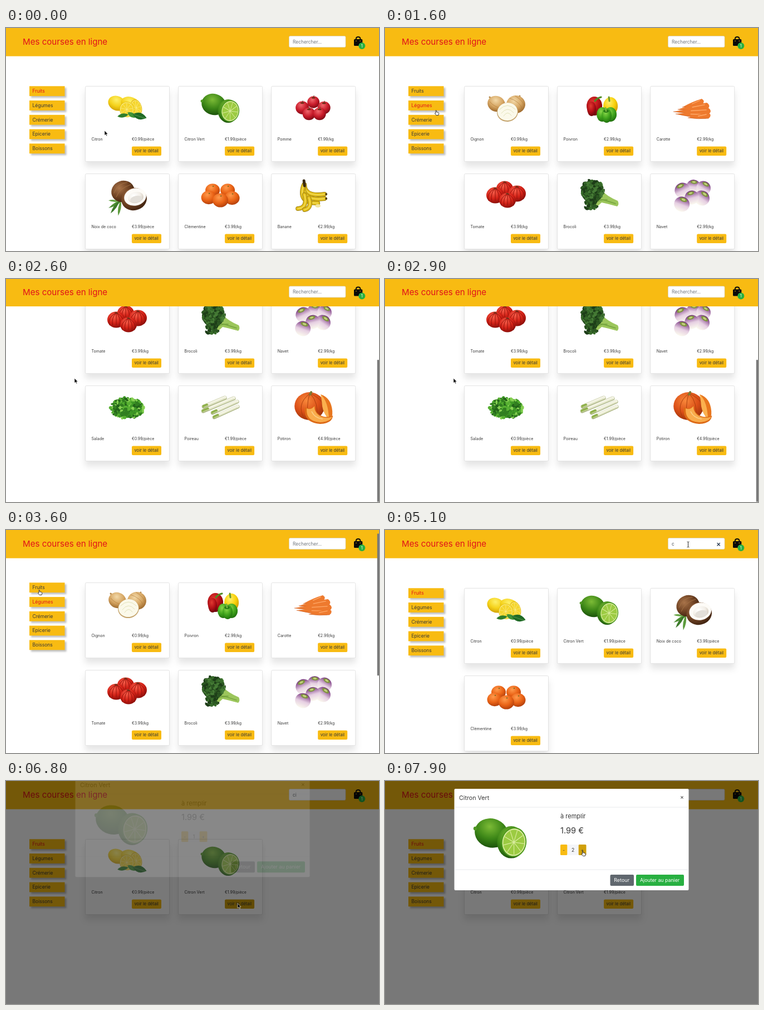
Animation, 670 px wide and 400 px high, one loop 8 s. Source, as an HTML page:

```html
<!DOCTYPE html>
<html lang="fr">
<head>
<meta charset="utf-8">
<title>Mes courses en ligne</title>
<style>
  html, body { margin: 0; width: 100%; height: 100%; overflow: hidden; background: #fff; }
  svg { display: block; width: 670px; height: 400px; font-family: Inter, "Open Sans", sans-serif; }
  text { fill: #383838; white-space: pre; }
  .card { fill: #fff; stroke: #dcdcdc; stroke-width: .8; filter: drop-shadow(0 9px 6px rgba(0, 0, 0, .1)); }
  .tab { fill: #f8bb12; filter: drop-shadow(3px 3px 1.5px rgba(0, 0, 0, .25)); }
</style>
</head>
<body>
<svg id="stage" viewBox="0 0 670 400"></svg>
<script>
const LOOP = 8000, GOLD = '#f8bb12', DARK_GOLD = '#d0a009', RED = '#e0131a', GREEN = '#28b041';
const MAX_SCROLL = 227, THUMB = 255;

let seed = 7;
const rand = () => (seed = seed * 16807 % 2147483647) / 2147483647;

// ---- drawing helpers ----
const text = (x, y, size, str, more = '') => `<text x="${x}" y="${y}" font-size="${size}" ${more}>${str}</text>`;
const rect = (x, y, w, h, fill, more = '') => `<rect x="${x}" y="${y}" width="${w}" height="${h}" fill="${fill}" ${more}/>`;
const ball = (x, y, rx, ry, fill, rot = 0) =>
  `<ellipse rx="${rx}" ry="${ry}" fill="${fill}" transform="translate(${x} ${y}) rotate(${rot})"/>`;
const shape = (d, fill) => `<path d="${d}" fill="${fill}"/>`;
const line = (d, color, w = 1) =>
  `<path d="${d}" fill="none" stroke="${color}" stroke-width="${w}" stroke-linecap="round"/>`;
const leaf = (x, y, l, w, rot, fill) =>
  `<path transform="translate(${x} ${y}) rotate(${rot})" d="M${-l} 0Q0 ${-w} ${l} 0Q0 ${w} ${-l} 0" fill="${fill}"/>`;

let gradients = '';
const stops = (a, b, c) => `<stop stop-color="${a}"/><stop offset=".55" stop-color="${b}"/><stop offset="1" stop-color="${c}"/>`;
const round = (id, a, b, c) => {
  gradients += `<radialGradient id="${id}" cx=".4" cy=".3" r=".75">${stops(a, b, c)}</radialGradient>`;
  return `url(#${id})`;
};
const lemon = round('lemon', '#fdf06a', '#f5d21a', '#d0a006');
const lime = round('lime', '#7cbb36', '#3c8617', '#194f0a');
const apple = round('apple', '#f0666c', '#c81b2a', '#740913');
const coco = round('coco', '#a9744a', '#6f4223', '#3a1f0e');
const milk = round('milk', '#ffffff', '#f3efe8', '#cfc5b8');
const orange = round('orange', '#ff9a4c', '#ea6316', '#ac3b0a');
const onion = round('onion', '#f3d9a8', '#d5a562', '#9a6529');
const redPep = round('redPep', '#e23a32', '#b20f16', '#62050a');
const yellowPep = round('yellowPep', '#fff06a', '#f8d008', '#c99300');
const greenPep = round('greenPep', '#8ad84a', '#3fa31c', '#1c6a0c');
const tomato = round('tomato', '#f8604c', '#d42318', '#820c08');
const pumpkin = round('pumpkin', '#f8883a', '#dc5018', '#98300a');
gradients += `<linearGradient id="navet" x2="0" y2="1">${stops('#6f2a78', '#e6cfe2', '#fbf9ee')}</linearGradient>`;

const slice = (x, y, rx, ry, rind, pith, flesh, rot = 0) => {
  let rays = '';
  for (let i = 0; i < 9; i++) {
    const a = i * Math.PI / 4.5;
    rays += `M0 0L${.8 * Math.cos(a)} ${.8 * Math.sin(a)}`;
  }
  return `<g transform="translate(${x} ${y}) rotate(${rot}) scale(${rx} ${ry})">` +
    ball(0, 0, 1, 1, rind) + ball(0, 0, .92, .92, pith) + ball(0, 0, .84, .84, flesh) + line(rays, pith, .05) + '</g>';
};

const cluster = (n, x, y, rx, ry, size, colors) => {
  let s = '';
  for (let i = 0; i < n; i++) {
    const a = rand() * 6.283, d = Math.sqrt(rand());
    s += ball(x + rx * d * Math.cos(a), y + ry * d * Math.sin(a), size * (.6 + rand() * .6), size * (.4 + rand() * .4),
      colors[Math.floor(rand() * colors.length)], rand() * 180);
  }
  return s;
};

const redApple = (x, y, r) => ball(x, y, r, r * .98, apple) + ball(x, y - r * .7, r * .3, 1.3, '#6b2a14') +
  line(`M${x} ${y - r * .7}l1 -4`, '#54381c', 1);
const clementine = (x, y, r) => ball(x, y, r, r * .9, orange) + ball(x + 1, y - r * .55, 1.3, .9, '#5c6b1c');
const ribbed = (x, y, r) => ball(x, y, r, r * .9, tomato) +
  [-.75, -.4, 0, .4, .75].map(k => line(`M${x} ${y - r * .8}Q${x + k * r * 1.4} ${y - r * .2} ${x + k * r} ${y + r * .6}`, '#931009', 1)).join('') +
  leaf(x, y - r * .78, 4, 2, 10, '#5a3a1e');
const turnip = (x, y, r, rot) => `<g transform="translate(${x} ${y}) rotate(${rot})">` +
  ball(0, 0, r, r * .95, 'url(#navet)') + ball(0, -r * .6, r * .5, r * .25, '#7f9440') + ball(0, -r * .62, r * .25, r * .12, '#c3cf7c') + '</g>';
const carrot = (x, y, tx, ty, w) => shape(`M${x} ${y - w}Q${x + w * 1.4} ${y} ${x} ${y + w}Q${(x + tx) / 2} ${(y + ty) / 2 + w} ${tx} ${ty}Q${(x + tx) / 2} ${(y + ty) / 2 - w} ${x} ${y - w}`, '#ee7a2e') +
  line(`M${x - 4} ${y - w * .4}L${(x + tx) / 2} ${(y + ty) / 2 - 1}`, '#ffab6b', 1.3) + line(`M${x} ${y + w}Q${(x + tx) / 2} ${(y + ty) / 2 + w} ${tx} ${ty}`, '#c9571a', .7);
const leek = (x, y, tx, ty) => line(`M${x} ${y}L${tx} ${ty}`, '#a3ad78', 6.8) + line(`M${x} ${y - .6}L${tx} ${ty - .6}`, '#f4f4e4', 5.4) +
  line(`M${x} ${y - .6}L${x + (tx - x) * .15} ${y + (ty - y) * .15 - .6}`, '#8fb14a', 5) + line(`M${x} ${y + 1}L${tx} ${ty + 1}`, '#d5dbb2', 1);
const banana = d => line(d, '#8d7310', 8) + line(d, '#e0bb18', 6.6) + line(d, '#f2da50', 2);

// Each picture is centred on 0,0 and about 70 wide.
const art = {
  'Citron': ball(-19, -9, 16, 13, lemon, 25) + ball(6, -8, 18, 12, lemon, 20) +
    slice(16, -1, 10, 15, '#e3b90c', '#fbec8a', '#f5d52c', -15) + slice(-1, 2, 13, 14, '#e8c410', '#fbec8a', '#f5d52c', -10) +
    leaf(-8, 13, 10, 7, -10, '#2f7d2b') + leaf(8, 12, 9, 8, 30, '#3f9336') + leaf(22, 14, 13, 12, 15, '#1f6a26') + line('M11 11L32 18', '#79b565', .6),
  'Citron Vert': ball(-12, -7, 22, 19, lime, 15) + ball(-33, -13, 2.5, 2.5, '#4e9622') + ball(14, 5, 18.5, 21, lime) +
    slice(17.5, 5, 16.5, 19.5, '#4d981c', '#d8eb9c', '#9ccb42', 8),
  'Pomme': redApple(0, -11, 11) + redApple(-20, -1, 12) + redApple(19, -1, 11.5) + redApple(-8, 10, 11.5) + redApple(11, 10, 11.5),
  'Noix de coco': leaf(-20, 14, 16, 5, -30, '#4f8f35') + leaf(-22, 20, 14, 5, -55, '#3d7a2b') + leaf(-24, 9, 10, 4, 5, '#67a445') +
    leaf(-14, 22, 14, 5, -80, '#5c9b3c') + ball(-8, -8, 21, 19, coco, -20) + line('M-24 -5Q-18 -22 0 -24M-20 2Q-14 -14 6 -20', '#a97748', .8) +
    ball(12, 6, 23, 20, coco, -12) + ball(14, 2, 20, 15.5, '#fdfbf7', -12) + ball(15, 3, 14, 10, milk, -12) + ball(16, 6, 11, 6, '#e3dfd9', -12),
  'Clémentine': clementine(-14, -10, 13) + clementine(13, -10, 13) + clementine(-21, 3, 13.5) + clementine(21, 4, 13.5) + clementine(0, 8, 14),
  'Banane': banana('M-16 -20Q-16 2 20 -3') + banana('M-17 -20Q-22 10 20 5') + banana('M-18 -18Q-28 14 8 13') + banana('M-16 -2Q-10 22 -28 23') +
    banana('M-8 4Q-2 22 -16 25') + line('M-17 -27L-16 -18', '#3b2a12', 5) + ball(23, -3, 2, 2, '#4c3b12') + ball(23, 5, 2, 2, '#4c3b12') + ball(8, 18, 5, 3, '#f2e6a2'),
  'Oignon': line('M-30 -20L-20 -10M24 -22L18 -12', '#b58a4e', 3) + ball(-18, -8, 16, 14, onion, 20) + ball(17, -7, 17, 16, onion) +
    line('M-30 -12Q-22 -2 -8 0M6 -18Q24 -12 28 0M16 -22Q30 -14 32 -4', '#b47d3b', .7) + ball(2, 7, 19, 17, '#c3a26a', -8) +
    ball(2, 6, 18, 16, '#fbf9ea', -8) + line('M-12 2Q2 -12 16 2M-9 9Q2 -5 13 8M-5 14Q2 3 9 13', '#dcdcae', .8),
  'Poivron': ball(-9, -4, 14, 17, redPep) + ball(-14, 1, 8, 13, redPep) + ball(20, -4, 13, 16, yellowPep) + line('M3 -20Q-5 -18 -8 -13', '#4e8c25', 3) +
    line('M17 -20L18 -13', '#6d9a2c', 3) + ball(5, 11, 10, 13, greenPep) + ball(20, 11, 11, 13, greenPep) + ball(13, 13, 9, 13, greenPep) +
    ball(12, 5, 5, 3, '#2a7d16') + line('M12 5l-1 -6', '#7cb542', 2.6),
  'Carotte': carrot(17, -12, -18, -2, 5) + carrot(26, -4, -26, 2, 6) + carrot(29, 5, -34, 6, 5.5) + carrot(24, 13, -30, 10, 5) + carrot(29, 13, -8, 17, 5),
  'Tomate': ribbed(-3, -13, 15) + ribbed(-20, -1, 16) + ribbed(19, -4, 16) + ribbed(2, 8, 15),
  'Brocoli': shape('M-16 4L6 -9Q12 0 33 9Q36 15 32 19Q14 14 4 12Q-6 22 -12 24Z', '#9cc65c') + line('M-4 5Q12 8 29 14M-6 12Q4 6 14 7', '#74a33c', 1.4) +
    ball(-13, -8, 20, 20, '#24491d') + cluster(150, -12, -10, 21, 18, 3.4, ['#2c5722', '#376a2a', '#1d3d18', '#457a35']) +
    cluster(60, -16, 16, 12, 9, 3.4, ['#2c5722', '#376a2a', '#1d3d18']),
  'Navet': turnip(2, -17, 12.5, 5) + turnip(20, -14, 13, 30) + turnip(-18, -10, 14, -25) + turnip(17, 4, 14, 35) + turnip(-1, 3, 13, -15) + turnip(-19, 15, 14, 20),
  'Salade': ball(0, 2, 28, 16, '#2c7419') + cluster(230, 0, 1, 30, 18, 4, ['#3f9a26', '#57b032', '#23641a', '#86d052', '#317f20']),
  'Poireau': leek(-30, -2, 8, -18) + leek(-31, 6, 24, -17) + leek(-14, 9, 30, -11) + leek(-11, 17, 31, -2),
  'Potiron': ball(-7, -3, 27, 25, pumpkin) + line('M-7 -25Q-32 -6 -16 20M-7 -25Q-14 0 -8 22M-5 -25Q10 -8 6 18M-4 -25Q22 -12 18 6', '#a53c0c', .9) +
    line('M-6 -24l2 -4', '#7d7a34', 4) + shape('M13 -24Q32 -18 34 6Q35 18 28 22Q26 0 13 -24Z', '#e8761e') + shape('M13 -24Q27 -12 28 22Q18 10 16 -2Q15 -14 13 -24Z', '#fbb04e') +
    shape('M-15 -1Q-20 26 12 29Q34 28 35 14Q22 20 10 12Q2 6 3 -4Q-6 4 -15 -1Z', '#dd6a16') +
    shape('M-12 1Q-14 24 12 26Q30 25 34 16Q20 21 9 13Q1 6 2 -3Q-5 5 -12 1Z', '#f9ac4c') + line('M-3 7Q2 18 16 20', '#fcd28c', 1.6)
};

const fruits = [['Citron', '0.99/pièce'], ['Citron Vert', '1.99/pièce'], ['Pomme', '1.99/kg'],
  ['Noix de coco', '3.99/pièce'], ['Clémentine', '3.99/kg'], ['Banane', '2.99/kg']];
const vegetables = [['Oignon', '0.99/kg'], ['Poivron', '2.99/kg'], ['Carotte', '2.99/kg'],
  ['Tomate', '3.99/kg'], ['Brocoli', '3.99/kg'], ['Navet', '2.99/kg'],
  ['Salade', '0.99/pièce'], ['Poireau', '1.99/pièce'], ['Potiron', '4.99/pièce']];
const search = word => fruits.filter(([name]) => name.toLowerCase().includes(word));

const card = ([name, price], i) => `<g transform="translate(${142.5 + i % 3 * 167.1} ${104.5 + Math.floor(i / 3) * 157})">` +
  '<rect class="card" width="151" height="135" rx="2"/>' + `<g transform="translate(75.5 39.5)">${art[name]}</g>` +
  text(11, 97, 7.1, name) + text(83.5, 97, 7, '€' + price) +
  rect(83.5, 108, 53, 16.5, GOLD, 'rx="2" class="buy"') + text(88, 118.8, 7.6, 'voir le détail') + '</g>';
const page = (id, list) => `<g id="${id}">${list.map(card).join('')}</g>`;

const tabs = ['Fruits', 'Légumes', 'Crémerie', 'Epicerie', 'Boissons'].map((name, i) => {
  const y = 104.3 + i * 25.75;
  return `<rect class="tab" x="42" y="${y}" width="63.5" height="17.8"/>` + text(47.5, y + 11.8, 8.5, name, `id="tab${i}"`);
}).join('');

const header = rect(0, -5, 670, 55.6, GOLD) +
  text(30, 30.3, 15.1, 'Mes courses en ligne', `style="fill:${RED}"`) +
  rect(508.5, 14.5, 101.5, 20, '#fff', 'rx="2" stroke="#d5d2c8" stroke-width=".7"') +
  text(515, 27.8, 8.4, '', 'id="query"') + '<path id="caret" d="M522.5 20.5V30" stroke="#333" stroke-width=".7"/>' +
  line('M597 23.5l4.4 4.4m0 -4.4l-4.4 4.4', '#2e3f55', 1.4).replace('<path', '<path id="clear"') +
  rect(625, 20, 15.3, 12, '#0a0a0a', 'rx="1.6"') + line('M628.8 23V19Q629 16 632.6 16Q636.2 16 636.4 19V23', '#0a0a0a', 1.9) +
  ball(629, 23.2, .8, .8, GOLD) + ball(636.2, 23.2, .8, .8, GOLD) + ball(639.3, 32, 6, 6, GREEN) +
  text(639.3, 34.8, 7.6, '1', 'text-anchor="middle" style="fill:#fff"');

const modal = rect(124.5, 14, 421, 182, '#fff', 'rx="2"') + text(133, 34.3, 10.7, 'Citron Vert') +
  text(533.5, 32.3, 10.5, '×', 'text-anchor="middle"') + line('M125 47H545M125 159H545', '#e2e4e7', .8) +
  `<g transform="translate(207.5 103) scale(1.37)">${art['Citron Vert']}</g>` +
  text(315, 67.3, 11, 'à remplir') + text(315, 94, 14.6, '1.99 €') +
  rect(327, 114, 21, 19, '#f4f5f8') + rect(315, 114, 12.3, 19, GOLD, 'rx="1.5"') + rect(347.7, 114, 13.8, 19, GOLD, 'rx="1.5" id="plus"') +
  text(321.2, 126.5, 8, '-', 'text-anchor="middle"') + text(354.5, 126.5, 8, '+', 'text-anchor="middle"') +
  text(337.5, 126.7, 8.6, '1', 'text-anchor="middle" id="count"') +
  rect(404.5, 168, 42.5, 20, '#60676e', 'rx="2"') + text(411.2, 181, 9, 'Retour', 'style="fill:#fff"') +
  rect(451, 168, 86, 20, GREEN, 'rx="2"') + text(458, 181, 8.8, 'Ajouter au panier', 'style="fill:#fff"');

const cursors =
  '<path id="arrow" d="M0 0V8.5L2 6.8L3.4 9.8L4.7 9.2L3.4 6.3H6Z" fill="#000" stroke="#fff" stroke-width=".6"/>' +
  '<path id="hand" d="M2 5.2V1Q2.7 0 3.4 1V3.6L7 4.6Q8 5 7.7 7L7 9.5H3L.4 6.2Q.8 4.9 2 6Z" fill="#fff" stroke="#111" stroke-width=".8"/>' +
  '<path id="beam" d="M-2 -5Q0 -5 0 -4V4Q0 5 -2 5M2 -5Q0 -5 0 -4V4Q0 5 2 5" fill="none" stroke="#222" stroke-width=".8"/>';

document.getElementById('stage').innerHTML = `<defs>${gradients}</defs>` +
  `<g id="content">${tabs}${page('fruits', fruits)}${page('vegetables', vegetables)}${page('c', search('c'))}${page('ci', search('ci'))}</g>` +
  `<g id="header">${header}</g>` + rect(666.8, 0, 3.2, THUMB, '#777', 'rx="1.5" id="thumb"') + rect(0, 0, 670, 400, '#000', 'id="shade"') +
  `<g id="modal">${modal}</g><g id="cursor">${cursors}</g>`;

// ---- animation ----
const $ = id => document.getElementById(id);
const show = (id, on) => $(id).style.display = on ? '' : 'none';
const clamp = (t, from, to) => Math.min(1, Math.max(0, (t - from) / (to - from)));
const smooth = k => k * k * (3 - 2 * k);
const during = (t, from, to) => t >= from && t < to;

// time, x, y, pointer
const path = [[0, 177, 184, 'arrow'], [400, 177, 184, 'arrow'], [1250, 89, 147, 'hand'], [1700, 89, 147, 'hand'],
  [2000, 123, 178, 'arrow'], [3000, 123, 178, 'arrow'], [3500, 57, 107, 'hand'], [4100, 57, 107, 'hand'],
  [4700, 544.5, 26, 'beam'], [5850, 544.5, 26, 'beam'], [6400, 414.5, 219.5, 'hand'], [6700, 414.5, 219.5, 'hand'],
  [6760, 416, 219.5, 'arrow'], [7000, 416, 219.5, 'arrow'], [7450, 452, 226, 'arrow'], [7800, 352.5, 125, 'hand'], [LOOP, 352.5, 125, 'hand']];

function moveCursor(t) {
  const i = path.findIndex(p => p[0] > t), a = path[i - 1], b = path[i];
  const k = smooth(clamp(t, a[0], b[0])), kind = k > .85 ? b[3] : a[3];
  $('cursor').setAttribute('transform', `translate(${a[1] + (b[1] - a[1]) * k} ${a[2] + (b[2] - a[2]) * k})`);
  for (const id of ['arrow', 'hand', 'beam']) show(id, id === kind);
  show('cursor', !during(t, 5200, 5880));
}

function scrollAt(t) {
  if (t < 3000) return MAX_SCROLL * smooth(clamp(t, 2080, 2560));
  return MAX_SCROLL * (1 - clamp(t, 3000, 3700)) ** 1.6;
}

function draw(now) {
  const t = now % LOOP, y = scrollAt(t);
  const word = t < 5100 ? '' : t < 5350 ? 'c' : 'ci';
  const current = during(t, 1400, 3950) ? 'vegetables' : word || 'fruits';
  for (const id of ['fruits', 'vegetables', 'c', 'ci']) show(id, id === current);
  $('tab0').style.fill = current === 'vegetables' ? '' : RED;
  $('tab1').style.fill = current === 'vegetables' ? RED : '';

  $('content').setAttribute('transform', `translate(0 ${-y})`);
  // the sticky header slides up slightly at the end of the page
  $('header').setAttribute('transform', `translate(0 ${-1.5 * clamp(y, 100, MAX_SCROLL)})`);
  $('thumb').setAttribute('y', y * 400 / (400 + MAX_SCROLL));
  $('thumb').style.opacity = clamp(t, 2080, 2150) * (1 - clamp(t, 3850, 4050));

  $('query').textContent = word || 'Rechercher...';
  $('query').style.fill = word ? '#495057' : '#70777e';
  const typing = word && t < 6680;
  show('caret', typing && word === 'ci');
  show('clear', typing);
  document.querySelectorAll('#ci .buy')[1].setAttribute('fill', during(t, 6330, 7050) ? DARK_GOLD : GOLD);

  const drop = 1 - (1 - clamp(t, 6780, 7080)) ** 1.8;
  $('shade').style.opacity = .53 * clamp(t, 6650, 6800);
  $('modal').style.opacity = clamp(t, 6783, 6933);
  $('modal').setAttribute('transform', `translate(0 ${-27 * (1 - drop)})`);
  $('plus').setAttribute('fill', t > 7740 ? DARK_GOLD : GOLD);
  $('count').textContent = t < 7880 ? 1 : 2;
  moveCursor(t);
}

const start = performance.now();
(function tick() {
  draw(performance.now() - start);
  requestAnimationFrame(tick);
})();
</script>
</body>
</html>
```
